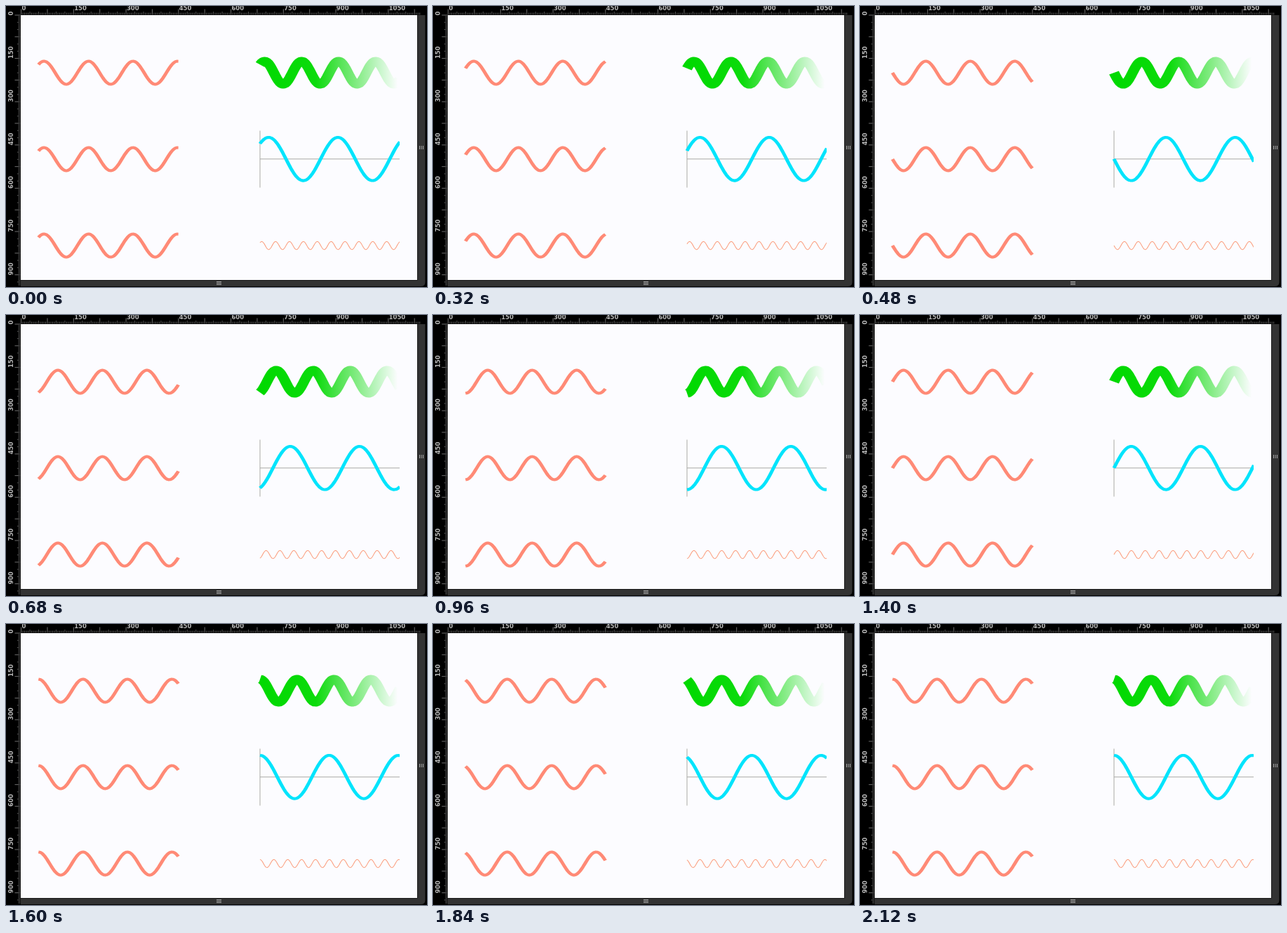
Animation, 600 px wide and 400 px high, one loop 2160 ms. Source, as an HTML page:

```html
<!DOCTYPE html>
<html lang="en">
<head>
<meta charset="utf-8">
<title>Sine waves</title>
<style>
  html, body { margin: 0; width: 100%; height: 100%; overflow: hidden; background: #000; }
  svg { display: block; width: 600px; height: 400px; }
  text { font: bold 8.5px "DejaVu Sans", sans-serif; fill: #b9b9b9; }
</style>
</head>
<body>
<svg id="stage" viewBox="0 0 600 400">
  <defs>
    <linearGradient id="fade" gradientUnits="userSpaceOnUse" x1="0" x2="400" y1="0" y2="0">
      <stop offset="0" stop-color="#00d900"/>
      <stop offset=".4" stop-color="#0cdb0c"/>
      <stop offset=".56" stop-color="#50e350"/>
      <stop offset=".7" stop-color="#86ec86"/>
      <stop offset=".84" stop-color="#c0f5c3"/>
      <stop offset=".94" stop-color="#eafbec"/>
      <stop offset=".985" stop-color="#fcfcff"/>
    </linearGradient>
    <clipPath id="area"><rect x="21" y="13" width="341" height="377"/><rect x="361.500" y="13" width="199.500" height="377"/></clipPath>
  </defs>
  <rect width="600" height="400"/>
  <rect x="21" y="13" width="565" height="377" fill="#fcfcff"/>
  <path d="M21 390.500H586.500V13H597.500V393Q597.500 399 591 399H21Z" fill="#333"/>
  <path d="M300 392.500h7m-7 2h7m-7 2h7M589.500 199v5m2.500-5v5m2.500-5v5" stroke="#a8a8a8"/>
  <g id="rulers"></g>
  <path d="M362 177.500V258.500M362 217.800H561" stroke="#a9a9a4" fill="none"/>
  <g clip-path="url(#area)"><g id="waves" fill="none" stroke-linejoin="round"></g></g>
</svg>
<script>
const NS = "http://www.w3.org/2000/svg";
const SCALE_X = 0.4983, SCALE_Y = 0.4107, ORIGIN_X = 21.6, ORIGIN_Y = 13;
const FRAME = 40, FRAMES = 54, SPAN = 400;

function add(parent, tag, attrs, text) {
  const node = document.createElementNS(NS, tag);
  for (const key in attrs) node.setAttribute(key, attrs[key]);
  if (text !== undefined) node.textContent = text;
  parent.appendChild(node);
  return node;
}

function drawRulers() {
  const group = document.getElementById("rulers");
  let minor = "", major = "";
  for (let u = 0; u <= 1140; u += 5) {
    const x = ORIGIN_X + u * SCALE_X, y = ORIGIN_Y + u * SCALE_Y;
    const long = u % 75 === 0;
    const size = long ? 8 : u % 25 === 0 ? 4.5 : 3;
    let ticks = `M${x} 12.5v${-size}`;
    if (y < 399) ticks += `M20.5 ${y}h${-size}`;
    if (long) major += ticks; else minor += ticks;
  }
  add(group, "path", { d: minor, stroke: "#808080", "stroke-width": 0.7 });
  add(group, "path", { d: major, stroke: "#8c8c8c", "stroke-width": 0.8 });
  for (let u = 0; u <= 1050; u += 150) {
    add(group, "text", { x: ORIGIN_X + u * SCALE_X + 0.8, y: 6.3 }, u);
    if (u > 900) continue;
    const y = ORIGIN_Y + u * SCALE_Y + 0.5;
    add(group, "text", { transform: `translate(10 ${y}) rotate(-90)` }, u);
  }
}

const salmon = { left: 46.3, amp: 40, period: 127.2, color: "#ff8a76", width: 10 };
const waves = [
  { ...salmon, y: 95 },
  { ...salmon, y: 218 },
  { ...salmon, y: 341 },
  { left: 362, y: 95, amp: 40, period: 105.8, color: "url(#fade)", width: 30 },
  { left: 362, y: 217.8, amp: 75, period: 198, color: "#00e4fc", width: 10 },
  { left: 362, y: 341, amp: 14, period: 39.7, color: "#fba284", width: 2.3 }
];

function buildWaves() {
  const group = document.getElementById("waves");
  for (const wave of waves) {
    wave.path = add(group, "path", {
      transform: `translate(${wave.left} ${wave.y}) scale(${SCALE_X} ${SCALE_Y})`,
      stroke: wave.color, "stroke-width": wave.width
    });
  }
}

// Travelled sixteenths of a wavelength; the pace wavers slightly.
const pace = [[0, 0], [8, 17], [17, 37], [30, 69], [40, 94], [46, 109], [53, 126]];

function travelled(frame) {
  const next = Math.max(1, pace.findIndex(([f]) => f >= frame));
  const [f0, s0] = pace[next - 1], [f1, s1] = pace[next];
  return Math.round(s0 + (s1 - s0) * (frame - f0) / (f1 - f0));
}

function wavePath({ amp, period }, phase) {
  const points = [];
  const count = Math.round(SPAN / Math.min(4, period / 16));
  for (let i = 0; i <= count; i++) {
    const x = SPAN * i / count;
    const y = -amp * Math.cos(2 * Math.PI * x / period - phase);
    points.push(x.toFixed(2) + " " + y.toFixed(2));
  }
  return "M" + points.join("L");
}

function render(time) {
  const frame = Math.floor(time / FRAME) % FRAMES;
  const phase = (travelled(frame) + 2) * Math.PI / 8;
  for (const wave of waves) wave.path.setAttribute("d", wavePath(wave, phase));
}

function tick() {
  render(performance.now() - start);
  requestAnimationFrame(tick);
}

drawRulers();
buildWaves();
const start = performance.now();
tick();
</script>
</body>
</html>
```
